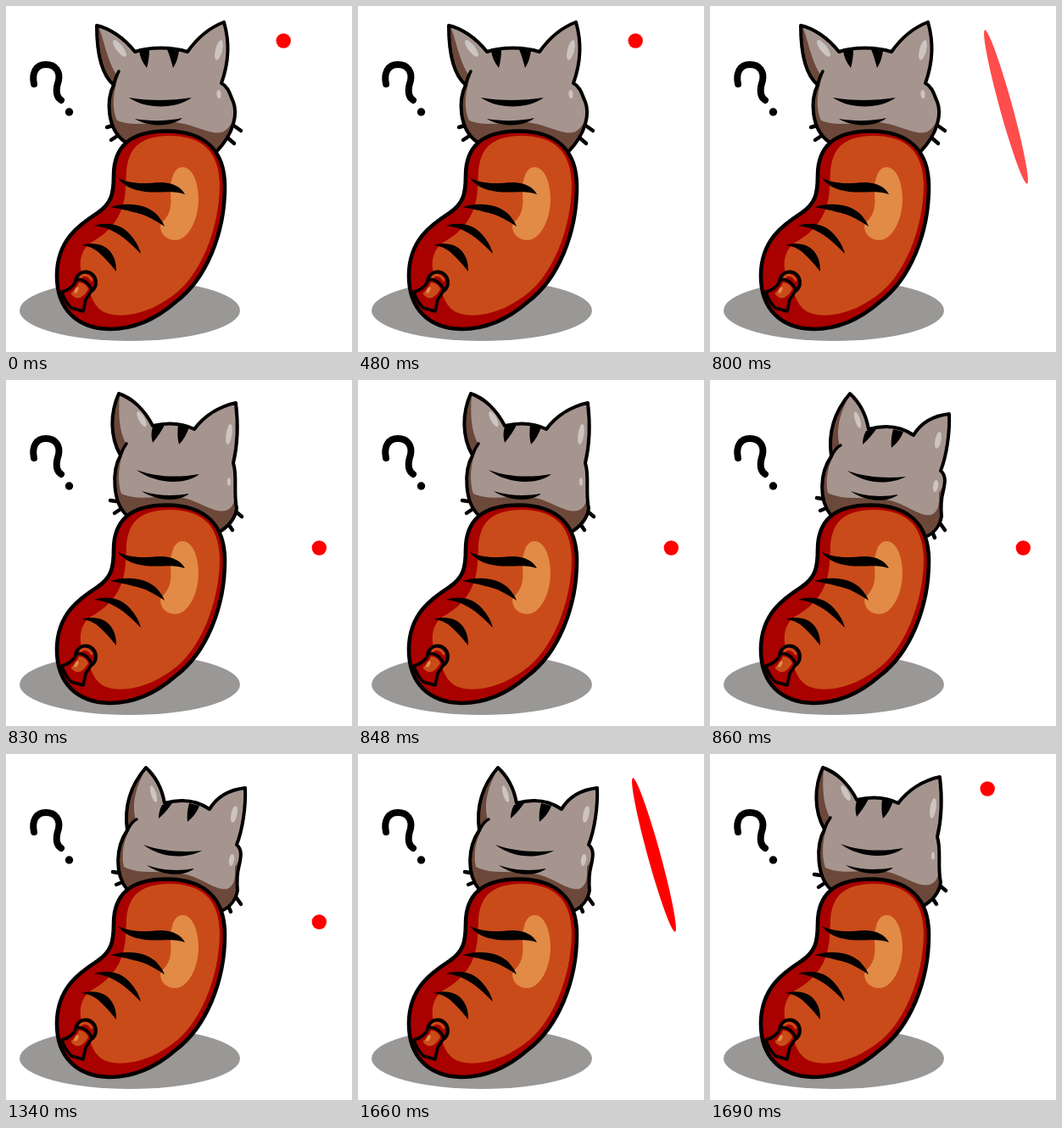
Animation, 408 px wide and 408 px high, one loop 1.72 s. Source, as an HTML page with a canvas:

```html
<!DOCTYPE html>
<html lang="en">
<head>
<meta charset="utf-8">
<title>Sausage cat and red dot</title>
<style>
html, body { margin: 0; width: 100%; height: 100%; overflow: hidden; background: #fff; }
canvas { display: block; width: 100vw; height: 100vh; }
</style>
</head>
<body>
<canvas id="stage"></canvas>
<script>
const SIZE = 408, LOOP = 1720;
const canvas = document.getElementById('stage');
const ctx = canvas.getContext('2d');

const INK = '#000', FUR = '#a6958f', FUR_SHADE = '#6b483a', FUR_LIGHT = '#cdc5c1';
const SKIN = '#c94b19', SKIN_SHADE = '#a90000', SKIN_LIGHT = '#e18b47', RED = '#f00';

function fill(path, color) {
  ctx.fillStyle = color;
  ctx.fill(new Path2D(path));
}

function stroke(path, width, color = INK) {
  ctx.strokeStyle = color;
  ctx.lineWidth = width;
  ctx.stroke(new Path2D(path));
}

function oval(x, y, rx, ry, color, turn = 0) {
  ctx.fillStyle = color;
  ctx.beginPath();
  ctx.ellipse(x, y, rx, ry, turn, 0, Math.PI * 2);
  ctx.fill();
}

// Head poses, turning from the upper dot towards the lower one.
const heads = {
  left: {
    outline: 'M107 23C121 26 139 37 152 54C169 48 196 48 214 54C226 37 241 25 257 19C264 43 262 69 254 91C262 95 264 104 268 113C273 126 270 149 248 172L140 160C119 145 118 111 127 93C110 79 107 48 107 23Z',
    fur: 'M109 24C116 41 119 63 129 79L133 82C128 96 123 119 131 135C148 143 176 136 196 137C222 138 246 156 258 147C266 142 269 132 270 122L280 95L270 10L212 40L150 40Z',
    creases: 'M127 93C128 87 130 82 133 77',
    marks: 'M157 53L169 51C169 59 168 66 166 73C161 67 158 60 157 53ZM190 51L204 53C203 60 201 67 197 73C195 66 193 58 190 51ZM145 108C166 112 195 112 219 108C200 122 165 122 145 108ZM152 133C170 136 190 136 208 132C196 143 168 143 152 133Z',
    whiskers: 'M119 143L126 141M124 158L130 154M270 142L277 147M262 156L269 162',
    shine: [[134, 50, 4, 12, -.65], [251, 52, 4, 12, .25], [251, 104, 2.5, 5, -.1]]
  },
  middle: {
    outline: 'M133 16C149 21 164 36 173 54C190 50 208 51 222 58C234 42 252 31 271 27C274 52 273 77 268 98C273 112 268 133 272 151C271 162 263 173 250 180L143 160C126 146 124 108 135 89C122 66 123 38 133 16Z',
    fur: 'M134 18C132 42 134 62 142 76C134 91 130 117 136 134C155 143 181 136 203 138C225 140 244 158 259 154C269 151 270 141 270 129L282 95L282 18L222 42L170 40Z',
    creases: 'M135 89C137 83 139 79 142 75',
    marks: 'M173 55L187 53C183 61 178 68 173 74C171 68 171 61 173 55ZM203 53L216 56C213 64 209 71 204 76C202 69 202 61 203 53ZM154 106C177 115 204 115 228 111C210 125 175 122 154 106ZM160 131C179 137 198 137 216 134C203 145 176 142 160 131Z',
    whiskers: 'M123 142L130 143M128 157L134 153M272 156L278 161M263 171L267 177',
    shine: [[160, 46, 3.5, 10, -.5], [263, 64, 3.5, 12, .15], [263, 120, 2, 4.5, 0]]
  },
  right: {
    outline: 'M165 16C176 26 184 41 187 58C205 53 224 54 240 65C249 50 264 42 282 40C283 62 279 89 272 107C279 113 277 122 275 131C272 142 272 150 273 161C271 172 264 181 254 185L143 160C128 142 129 110 143 90C139 62 146 38 165 16Z',
    fur: 'M165 18C150 43 149 64 153 78C140 94 135 116 139 133C158 143 184 137 207 141C229 144 247 162 261 159C271 154 270 144 270 133L288 105L292 30L240 50L187 46Z',
    creases: 'M143 90C146 84 150 79 154 77',
    marks: 'M184 60L196 58C191 65 186 71 180 76C180 71 181 65 184 60ZM216 58L228 61C225 69 220 75 214 80C213 73 214 65 216 58ZM162 107C184 115 208 116 231 114C212 124 183 123 162 107ZM166 131C186 138 204 138 222 135C208 146 182 143 166 131Z',
    whiskers: 'M126 139L132 140M130 154L135 152M272 170L277 177M262 179L265 186',
    shine: [[174, 47, 3, 10, -.3], [269, 71, 3.5, 10, .2], [266, 125, 3, 7, .15]]
  }
};

function drawHead(head) {
  stroke(head.whiskers, 4.5);
  ctx.save();
  ctx.clip(new Path2D(head.outline));
  fill(head.outline, FUR_SHADE);
  fill(head.fur, FUR);
  for (const [x, y, rx, ry, turn] of head.shine) oval(x, y, rx, ry, FUR_LIGHT, turn);
  ctx.restore();
  fill(head.marks, INK);
  stroke(head.outline, 4);
  stroke(head.creases, 3.5);
}

function drawBody() {
  const skin = 'M127 200C127 163 149 147.5 190 147.5C233 148 258 169 258 213C258 268 236 322 200 349C176 370 150 381 122 381C84 380 60 358 60 318C60 275 88 257 108 244C124 233 127 222 127 200Z';
  fill(skin, SKIN_SHADE);
  fill('M142 194C145 165 160 154 192 153C231 153 251 171 252 210C252 264 228 320 196 342C172 360 146 367 126 364C106 361 102 346 98 336C84 313 84 291 100 279C124 266 139 247 141 216Z', SKIN);
  fill('M208 190C220 190 227 208 227 228C227 253 214 276 200 276C189 276 182 269 182 259C185 253 190 251 193 241C197 228 191 216 196 203C198 194 203 190 208 190Z', SKIN_LIGHT);
  stroke(skin, 4.6);
  fill('M132 203C150 211 165 209 182 208C196 208 206 213 211 222C195 217 180 221 164 219C149 217 139 212 132 203Z', INK);
  fill('M123 237C142 231 163 233 176 244C182 250 185 255 187 260C175 252 165 246 150 243C140 240 132 239 123 237Z', INK);
  fill('M104 259C119 254 136 257 146 269C153 277 157 284 159 292C148 281 138 271 125 265C118 261 111 260 104 259Z', INK);
  fill('M89 282C104 278 117 281 124 291C129 298 130 305 130 313C121 302 114 294 106 288C100 284 95 283 89 282Z', INK);
}

function drawKnot() {
  oval(94, 326, 14, 14.5, INK);
  oval(94, 326, 10, 10.5, SKIN_SHADE);
  stroke('M87 321C91 315 98 317 101 323', 3, SKIN);
  const tail = 'M83 323C80 331 74 335 66 337C68 345 72 351 77 356L91 360L94 346C97 342 100 338 101 334C96 325 89 321 83 323Z';
  fill(tail, SKIN_SHADE);
  fill('M86 326C92 326 96 330 97 334C93 341 87 346 82 344C78 342 76 339 77 338C82 335 84 331 86 326Z', SKIN);
  oval(83, 335, 2, 4, SKIN_LIGHT, .5);
  stroke(tail, 3.6);
}

function drawQuestion() {
  stroke('M33 92C30 78 36 69 47 69C59 69 64 78 62 88C58 100 59 107 65 111', 8);
  oval(74.5, 125, 4.7, 4.7, INK);
}

function drawStreak(opacity) {
  ctx.globalAlpha = opacity;
  oval(349, 119, 94, 7.5, RED, Math.atan2(182, 50));
  ctx.globalAlpha = 1;
}

function poseAt(t) {
  if (t < 830) return heads.left;
  if (t < 860) return heads.middle;
  return t < 1690 ? heads.right : heads.middle;
}

function drawLaser(t) {
  if (t >= 800 && t < 830) drawStreak(.7);
  else if (t >= 1660 && t < 1690) drawStreak(1);
  else if (t >= 830 && t < 1660) oval(369.3, 198, 8.7, 8.7, RED);
  else oval(327.2, 41, 8.7, 8.7, RED);
}

function render(now) {
  const t = now % LOOP;
  const ratio = window.devicePixelRatio || 1;
  const width = Math.round(innerWidth * ratio), height = Math.round(innerHeight * ratio);
  if (canvas.width !== width || canvas.height !== height) {
    canvas.width = width;
    canvas.height = height;
  }
  ctx.setTransform(width / SIZE, 0, 0, height / SIZE, 0, 0);
  ctx.lineCap = ctx.lineJoin = 'round';
  ctx.fillStyle = '#fff';
  ctx.fillRect(0, 0, SIZE, SIZE);
  oval(146, 359, 130, 36, '#999896');
  drawHead(poseAt(t));
  drawBody();
  drawKnot();
  drawQuestion();
  drawLaser(t);
}

function loop() {
  render(performance.now());
  requestAnimationFrame(loop);
}
loop();
</script>
</body>
</html>
```
